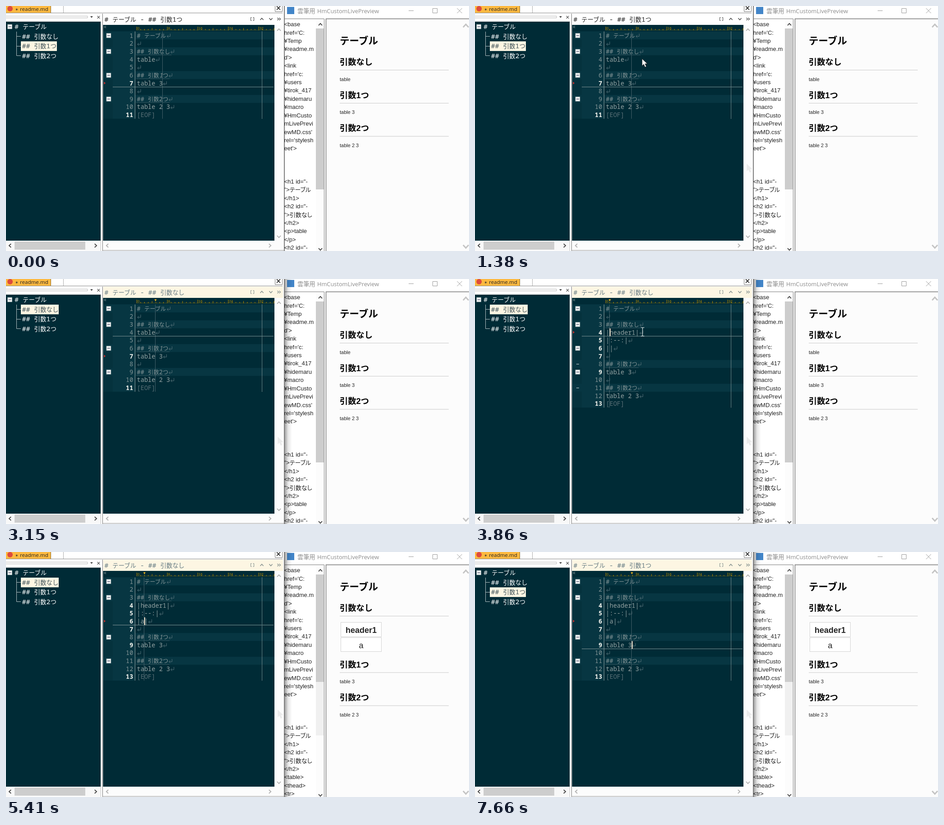
Recreate the animation shown at these times as an HTML page. Size 1028 by 545 pixels, loop 8000 ms.

```html
<!DOCTYPE html>
<html lang="ja">
<head>
<meta charset="utf-8">
<title>Live preview</title>
<style>
html, body { margin: 0; width: 100%; height: 100%; overflow: hidden; background: #fff; }
svg { display: block; width: 1028px; height: 545px; }
text { white-space: pre; }
.code { font-family: "Noto Sans Mono", "Noto Sans CJK JP", monospace; }
.ui { font-family: "Open Sans", "Noto Sans CJK JP", sans-serif; }
.page { font-family: "Liberation Sans", "Noto Sans CJK JP", sans-serif; }
</style>
</head>
<body>
<svg viewBox="0 0 1028 545">
<defs><linearGradient id="shade">
<stop offset="0" stop-opacity=".36"/><stop offset=".45" stop-opacity=".1"/><stop offset="1" stop-opacity="0"/>
</linearGradient></defs>
<g id="frame"></g><g id="view"></g><g id="pointer"></g>
</svg>
<script>
const LOOP = 8000, CELL = 8.2, WIDE = 12.3, ROW = 17.65, LEFT = 290.5, TOP = 56.6;
const DARK = '#002b36', BAND = '#073642', CREAM = '#fdf6e3';

const esc = s => s.replace(/&/g, '&amp;').replace(/</g, '&lt;').replace(/>/g, '&gt;');
const rect = (x, y, w, h, fill, more = '') =>
  `<rect x="${x}" y="${y}" width="${w}" height="${h}" fill="${fill}" ${more}/>`;
const path = (d, color, width = 1, more = '') =>
  `<path d="${d}" fill="none" stroke="${color}" stroke-width="${width}" ${more}/>`;
const text = (x, y, s, size, fill, cls, more = '') =>
  `<text x="${x}" y="${y}" font-size="${size}" fill="${fill}" class="${cls}" ${more}>${esc(s)}</text>`;

// Latin and Japanese runs have their own sizes; wide glyphs are 1.5 cells.
function mixed(x, y, s, cell, fill, slant = false) {
  const runs = s.match(/[\x00-\x7f]+|[^\x00-\x7f]+/g) || [];
  const spans = runs.map(r => {
    const latin = r.charCodeAt(0) < 128;
    const style = slant && r === '1' ? ' font-style="italic"' : '';
    const family = latin ? '' : ` font-family="'Noto Sans CJK JP', sans-serif"`;
    return `<tspan font-size="${latin ? cell / 0.6 : cell * 1.5}"${family}${style}>${esc(r)}</tspan>`;
  });
  return `<text x="${x}" y="${y}" fill="${fill}" class="code">${spans.join('')}</text>`;
}

const widthOf = s => [...s].reduce((w, c) => w + (c.charCodeAt(0) < 128 ? CELL : WIDE), 0);
const rowTop = n => TOP + (n - 1) * ROW;
const at = (t, steps) => steps.reduce((v, [time, next]) => t >= time ? next : v, steps[0][1]);

// Chevron: dx, dy give the pointing direction.
function chevron(x, y, dx, dy, r, color, width = 1.8) {
  const h = r * 0.55;
  const a = dx ? `M${x - dx * h} ${y - r}L${x + dx * h} ${y}L${x - dx * h} ${y + r}`
               : `M${x - r} ${y - dy * h}L${x} ${y + dy * h}L${x + r} ${y - dy * h}`;
  return path(a, color, width);
}
const cross = (x, y, r, color, width) =>
  path(`M${x - r} ${y - r}l${2 * r} ${2 * r}M${x + r} ${y - r}l${-2 * r} ${2 * r}`, color, width);

function ruler() {
  let out = path('M290 53.5H596', '#8a7a1c', 1, 'stroke-dasharray="1 1"');
  for (let i = 0; i <= 36; i++) {
    const x = 290.5 + i * 8.46, h = i % 8 ? (i % 4 ? 3 : 5) : 8;
    out += path(`M${x} 54v${-h}`, '#b58900');
    if (i % 8 === 0) out += text(x + 1.5, 52, String(i), 8, '#b58900', 'page');
  }
  return out;
}

function windows() {
  return rect(0, 0, 1028, 545, '#fff')
    // tab strip and tree toolbar
    + rect(0, 0, 99, 15, '#fdb940') + path('M99.5 0V15', '#8b6a2c')
    + path('M0 15.5H614', '#888') + path('M127.5 0V15', '#aaa')
    + '<circle cx="9" cy="6" r="6" fill="#dd4b3e"/>'
    + text(20, 11, '✶', 9, '#333', 'ui') + text(31, 11, 'readme.md', 11.6, '#222', 'ui')
    + path('M597.5 0V12.5H613.5V0', '#777') + cross(605, 4.5, 4, '#111', 1.5)
    + path('M0 22.5H181M0 26.5H181M181 22.5v4', '#b5b5b5')
    + '<path d="M187 23h6l-3 3z" fill="#222"/>' + cross(205.5, 25, 2.8, '#444', 1.1)
    // tree pane
    + rect(0, 35, 210, 487, DARK) + path('M0 34.5H210M210.5 34V545', '#c4c4c4')
    + rect(0, 522, 210, 22, '#f8f8f8') + rect(19, 524, 157, 18, '#cdcdcd')
    + chevron(9, 533, -1, 0, 4, '#444') + chevron(199, 533, 1, 0, 4, '#444')
    + path('M23.5 57V110.5M23.5 67.5H33M23.5 89.5H33M23.5 110.5H33', '#b8c4c6')
    + foldBox(8.5, 46) + mixed(19, 51, '# テーブル', 9, '#fff')
    // editor
    + path('M214.5 17V545', '#707070') + rect(215.5, 42, 380.5, 480, DARK)
    + text(217, 50, '«', 12, '#7d9094', 'ui') + ruler()
    + rect(596, 42, 20, 502, '#fcfcfc') + rect(216, 522, 400, 21, '#fcfcfc')
    + chevron(606, 53, 0, -1, 4, '#b0b0b0') + chevron(606, 513, 0, 1, 4, '#b0b0b0')
    + chevron(225, 533, -1, 0, 4, '#b0b0b0') + chevron(586, 533, 1, 0, 4, '#b0b0b0')
    + path('M214 543.5H617', '#999')
    // preview window
    + rect(619, 0, 409, 27, '#fff') + rect(624, 2, 16, 16, '#4285c8')
    + text(647, 16, '雲筆用', 13.2, '#8c8c8c', 'ui') + text(691, 16, 'HmCustomLivePreview', 12.8, '#8c8c8c', 'ui')
    + path('M894 10.5H905M947.5 5.5H957.5V15.5H947.5Z', '#999') + cross(1007, 10.5, 5.5, '#999', 1)
    + rect(711, 29, 317, 516, '#fcfcfc')
    + path('M619 28.5H706.5V545', '#777') + path('M710.5 545V28.5H1028', '#777', 1.5)
    + rect(688, 30, 18, 515, '#fcfcfc')
    + chevron(698, 41, 0, -1, 4, '#444') + chevron(698, 541, 0, 1, 4, '#444')
    + chevron(1021, 44, 0, -1, 6, '#c4c4c4', 3) + chevron(1021, 535, 0, 1, 6, '#c4c4c4', 3)
    + path('M618 0V545', '#555', 1.5);
}

function foldBox(x, y) {
  return rect(x - 5, y - 5, 10, 10, '#eef2f2', 'stroke="#8a9a9c" stroke-width=".6"') + minus(x, y);
}
const minus = (x, y) => path(`M${x - 3} ${y}h6`, '#224');

function tree(selected) {
  return ['引数なし', '引数1つ', '引数2つ'].map((name, i) => {
    const label = '## ' + name, on = i === selected, y = 67.7 + i * 21.6;
    const w = name === '引数なし' ? 84 : 80;
    return (on ? rect(33, y - 10.7, w, 21.5, CREAM) : '')
      + mixed(35.5, y + 5, label, 9, on ? '#40545a' : '#fff');
  }).join('');
}

function titleBar(focused, section) {
  const c = focused ? '#657b83' : '#222', icon = focused ? '#7f8c8c' : '#444';
  return rect(216, 17, 399, 25, focused ? CREAM : '#fff')
    + mixed(218.5, 34.5, '# テーブル - ## ' + section, 8.93, c)
    + path('M545.5 25.5h-2v7h2M548.5 25.5h2v7h-2', icon)
    + chevron(568, 29, 0, -1, 3.5, icon, 1.5) + chevron(588, 29, 0, 1, 3.5, icon, 1.5)
    + chevron(604, 29, 1, 0, 2.8, icon, 1.2) + chevron(608, 29, 1, 0, 2.8, icon, 1.2);
}

function docLines(t) {
  const body = t < 3700 ? ['table'] : ['|header1|', '|:--:|', t < 5260 ? '||' : '|a|'];
  return ['# テーブル', '', '## 引数なし', ...body, '', '## 引数1つ', 'table 3', '',
    '## 引数2つ', 'table 2 3', '[EOF]'];
}

function folds(t) {
  const before = [6, 9], after = [8, 11], mid = n => rowTop(n) + 9.2;
  const boxes = [1, 3, ...(t < 4010 ? before : after)].map(n => foldBox(228, mid(n)));
  const early = t >= 3860 && t < 4010 ? after.map(n => path(`M225 ${mid(n)}h6`, '#dfe6e6')) : [];
  return boxes.concat(early).join('');
}

function editor(t) {
  const lines = docLines(t), expanded = t >= 3700;
  const row = at(t, [[0, 7], [1610, 4], [4710, 5], [4880, 6], [6970, 7], [7280, 8], [7430, 9]]);
  const col = at(t, [[0, 7], [1610, 5], [3700, 1], [5260, 2], [6970, 0], [7280, 2], [7660, 7]]);
  const changed = expanded ? [4, 5, 6, 7, 9, 13] : [7, 11];
  const height = lines.length * ROW, bottom = TOP + height;
  const caretX = LEFT + col * CELL;
  let out = rect(216, TOP, 21, height, '#05323d') + rect(237, TOP, 49, height, BAND);
  lines.forEach((s, i) => {
    const n = i + 1, y = rowTop(n), base = y + 14, end = LEFT + widthOf(s);
    const heading = s[0] === '#', bold = changed.includes(n);
    if (heading) out += rect(216, y, 380, ROW, BAND);
    out += text(282.5, base, String(n), CELL / 0.6, bold ? '#f4f4ee' : '#839496', 'code',
      `text-anchor="end" font-weight="${bold ? 700 : 400}"`);
    out += mixed(LEFT, base, s, CELL, s === '[EOF]' ? '#586e75' : heading ? '#839496' : '#93a1a1', heading);
    if (heading && n > 1) out += path(`M290 ${y + 17}H${end + 3}`, '#526a71', 1, 'stroke-dasharray="2 1"');
    if (s !== '[EOF]') out += path(`M${end + 8.5} ${y + 5}v6h-7m3 -3l-3 3l3 3`, '#557078');
  });
  out += path(`M286.5 ${TOP}V${bottom}`, '#93a1a1');
  out += path(`M568.5 ${TOP}V${bottom}`, '#a5b0ae', 1, 'stroke-dasharray="2 1"');
  out += path(`M${Math.round(caretX) - 0.5} ${TOP}V${bottom}`, '#45616a');
  out += path(`M237 ${rowTop(row + 1)}H594`, '#839496');
  const mark = rowTop(at(t, [[0, 7], [3700, 4], [5260, 6]])) + 8.9;
  out += `<path d="M217.5 ${mark - 3}l3.5 3l-3.5 3z" fill="#dc322f"/>` + folds(t);
  if (t >= 1610) out += `<path d="M${caretX - 2} 45h5l-2.5 5z" fill="#e0ad20"/>`;
  if (t >= 1610 && (t < 3150 || t >= 3400))
    out += rect(Math.round(caretX), rowTop(row) + 0.5, 2, 17, '#f4e4cd');
  return out;
}

const HEAD = `<base|href='C:|¥Temp|¥readme.m|d'>|<link|href='c:|¥users|¥tirok_417|¥hidemaru|¥macro|¥HmCusto|mLivePrevi|ewMD.css'|rel='stylesh|eet'>||||<h1 id="-|">テーブル|</h1>|<h2 id="-|">引数なし|</h2>`.split('|');

function markup(hasTable) {
  const tail = hasTable ? ['<table>', '<thead>', '<tr>'] : ['<p>table', '</p>', '<h2 id="-'];
  return rect(688, 50, 18, 358, hasTable ? '#f0f0f0' : '#cdcdcd')
    + (hasTable ? rect(688, 50, 18, 239, '#cdcdcd') : '')
    + HEAD.concat(tail).map((s, i) => text(617.5, 45.2 + i * 18.41, s, 13, '#222', 'page',
      `style="font-feature-settings:'palt'"`)).join('');
}

function cell(y, h, s, weight) {
  return rect(743.5, y, 90, h, '#fff', 'stroke="#d2d2d2"')
    + text(788.5, y + 23, s, 18, '#222', 'page', `text-anchor="middle" font-weight="${weight}"`);
}

function preview(rows) {
  const shift = [0, 22, 52][rows];
  const h2 = (y, s) => text(741, y, s, 18.3, '#000', 'page', 'font-weight="700"')
    + path(`M741 ${y + 11.5}H983`, '#c8c8c8');
  const p = (y, s) => text(741, y, s, 11, '#222', 'page');
  return text(741, 85, 'テーブル', 21.6, '#000', 'page', 'font-weight="700"') + h2(131, '引数なし')
    + (rows ? cell(156.5, 32, 'header1', 700) : p(166.5, 'table'))
    + (rows > 1 ? cell(190.5, 31, 'a', 400) : '')
    + h2(204.7 + shift, '引数1つ') + p(240.3 + shift, 'table 3')
    + h2(278.4 + shift, '引数2つ') + p(314 + shift, 'table 2 3');
}

const arrow = (x, y, fill, stroke) =>
  `<path transform="translate(${x} ${y})" d="M.5 .5V16L4.2 12.6L7 19L9.8 17.8L7 11.6H12Z" fill="${fill}" stroke="${stroke}" stroke-width=".8"/>`;
const beam = (x, y) => path(`M${x - 4} ${y - 9.5}h3l1 1l1 -1h3M${x} ${y - 8.5}v17M${x - 4} ${y + 9.5}h3l1 -1l1 1h3`, '#e8eded', 1.2);

function pointer(t) {
  const ghost = t >= 685 ? arrow(603, 351, '#ebebeb', '#ebebeb') : '';
  const kind = at(t, [[0, ''], [300, 'arrow'], [1690, 'beam'], [3150, ''], [3400, 'arrow'],
    [3470, 'beam'], [4330, 'arrow'], [4710, '']]);
  if (!kind) return ghost;
  let x = 370.5, y = 117;
  if (t < 1300) {
    const u = Math.min(10, Math.floor((t - 300) / 77)) / 10;
    const e = (u + u * u * (3 - 2 * u)) / 2;
    x = 750 - 378 * e;
    y = 477 - 371 * e + 76 * e * (1 - e);
  } else if (t < 1380) {
    x = 371.5;
    y = 111;
  }
  return ghost + (kind === 'beam' ? beam(372, 117.5) : arrow(x, y, '#fff', '#222'));
}

const shown = {};
function put(id, html) {
  if (shown[id] === html) return;
  shown[id] = html;
  document.getElementById(id).innerHTML = html;
}

function render(t) {
  const section = at(t, [[0, 1], [1610, 0], [7280, 1]]), focused = t >= 1610;
  put('view', tree(section) + titleBar(focused, section ? '引数1つ' : '引数なし')
    + editor(t) + markup(t >= 4330) + preview(at(t, [[0, 0], [4330, 1], [5410, 2]]))
    + (focused ? rect(619, 0, 16, 545, 'url(#shade)') : ''));
  put('pointer', pointer(t));
}

put('frame', windows());
const start = performance.now();
function tick() {
  render((performance.now() - start) % LOOP);
  requestAnimationFrame(tick);
}
tick();
</script>
</body>
</html>
```
